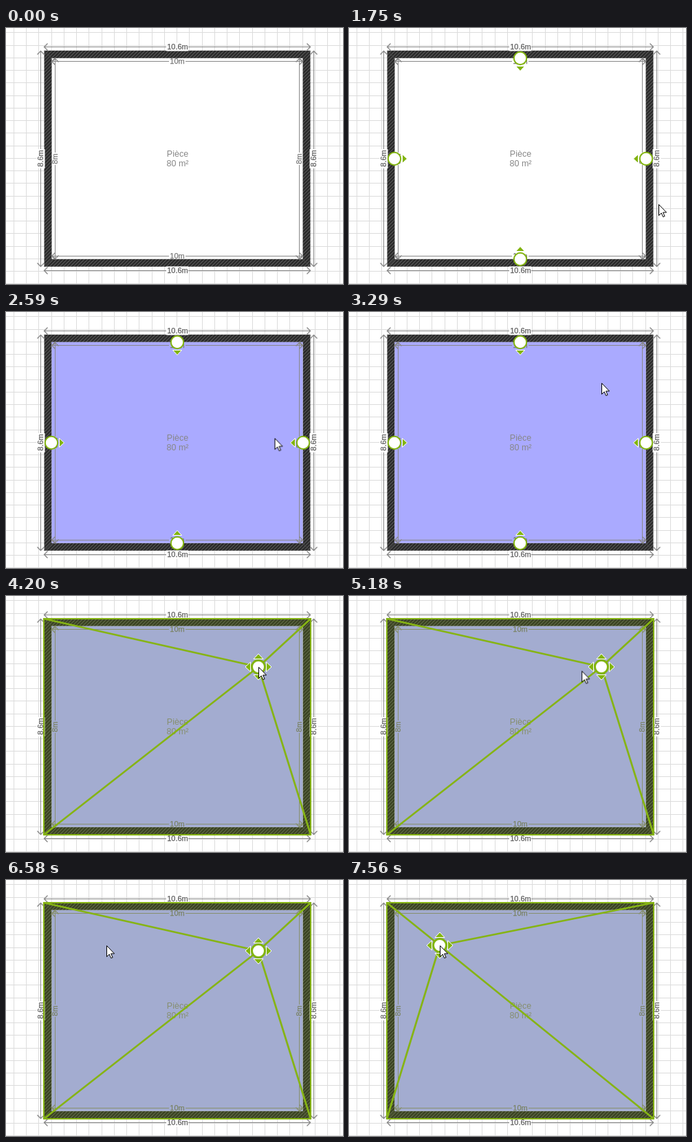
Write an HTML page that moves like this. It is 490 by 372 pixels and loops after 8 s.

```html
<!DOCTYPE html>
<html lang="fr">
<head>
<meta charset="utf-8">
<title>Plan de pièce</title>
<style>
html, body { margin: 0; width: 100%; height: 100%; overflow: hidden; background: #fff; }
svg { display: block; width: 490px; height: 372px; font-family: "Liberation Sans", Arial, sans-serif; text-anchor: middle; }
.grid { stroke: #dcdcdc; }
.dim path { fill: none; stroke: #888; }
.dim text { font-size: 11px; fill: #5c5c5c; stroke: #5c5c5c; stroke-width: .25px; }
.dim.inner text { fill: #777; stroke: #777; }
.name { font-size: 12.5px; fill: #878787; }
.knob { fill: #fff; stroke: #82b40f; }
.arrow { fill: #82b40f; stroke: #fff; }
.roof { fill: none; stroke: #86b414; stroke-width: 2.7; }

/* Switches start hidden; the small negative delay keeps steps clear of their boundaries. */
.timed { visibility: hidden; animation: 8s step-end -5ms infinite; }
#knobs { animation-name: knobs; }
#hover { animation-name: hover; }
#select { animation-name: select; }
#roofA { animation-name: roof-a; }
#roofB { animation-name: roof-b; }
@keyframes knobs { 7.875% { visibility: visible } 52.5%, 100% { visibility: hidden } }
@keyframes hover { 22.75%, 100% { visibility: visible } }
@keyframes select { 52.5%, 100% { visibility: visible } }
@keyframes roof-a { 52.5% { visibility: visible } 94.5%, 100% { visibility: hidden } }
@keyframes roof-b { 94.5%, 100% { visibility: visible } }

/* The pointer advances once every 70 ms. */
#pointer { animation: pointer 8s -5ms infinite; }
@keyframes pointer {
  0% { transform: translate(600px, 266px); animation-timing-function: step-end }
  20.125% { transform: translate(488px, 266px); animation-timing-function: steps(2) }
  21.875% { transform: translate(450px, 256px); animation-timing-function: steps(1) }
  22.75% { transform: translate(424px, 248px); animation-timing-function: steps(2) }
  24.5% { transform: translate(409px, 237px); animation-timing-function: steps(6) }
  29.75% { transform: translate(398px, 209px); animation-timing-function: steps(12) }
  40.25% { transform: translate(368px, 106px); animation-timing-function: steps(1) }
  41.125%, 61.25% { transform: translate(367px, 103px); animation-timing-function: steps(5) }
  65.625% { transform: translate(331px, 110px); animation-timing-function: steps(7) }
  71.75% { transform: translate(275px, 108px); animation-timing-function: steps(1) }
  72.625% { transform: translate(268px, 107px); animation-timing-function: steps(11) }
  82.25% { transform: translate(146px, 95px); animation-timing-function: steps(3) }
  84.875%, 100% { transform: translate(132px, 95px) }
}
</style>
</head>
<body>
<svg viewBox="0 0 490 372">
  <defs>
    <pattern id="hatch" width="5" height="5" patternUnits="userSpaceOnUse">
      <rect width="5" height="5" fill="#2d2d2d"/>
      <path d="M-1 1L1-1M-1 6L6-1M4 6L6 4" stroke="#656565"/>
    </pattern>
  </defs>
  <path class="grid" id="grid"/>
  <rect x="55.5" y="32.8" width="387" height="314" fill="url(#hatch)"/>
  <path d="M55.5 33l11 11M442.5 33l-11 11M55.5 347l11-11M442.5 347l-11-11" stroke="#4a4a4a"/>
  <rect x="66.5" y="43.8" width="365" height="292" fill="#fff"/>
  <rect class="timed" id="hover" x="66.5" y="43.8" width="365" height="292" fill="#aaf"/>
  <g id="dims"></g>
  <g class="name">
    <text x="249.5" y="187">Pièce</text>
    <text x="249.5" y="201">80 m²</text>
  </g>
  <g class="timed" id="knobs"></g>
  <rect class="timed" id="select" x="55" y="33" width="388" height="314" fill="#82b400" fill-opacity=".185" stroke="#86b414" stroke-width="2"/>
  <g class="timed" id="roofA"></g>
  <g class="timed" id="roofB"></g>
  <path id="pointer" d="M.5 .5v16l3.7-3.6 2.5 5.6 2.4-1-2.5-5.5h5z" fill="#fff" stroke="#000"/>
</svg>
<script>
const byId = id => document.getElementById(id);

// Half-metre grid aligned with the inner wall faces, snapped to whole pixels.
function gridPath() {
  const pitch = 18.25;
  let d = '';
  for (let i = -3; i < 24; i++) d += `M${Math.round(66.5 + pitch * i) - .5} 0V372`;
  for (let i = -2; i < 19; i++) d += `M0 ${Math.round(43.8 + pitch * i) - .5}H490`;
  return d;
}

// Dimension line starting at (x, y); vertical ones run upwards.
function dim(x, y, length, label, vertical, inner) {
  const mid = length / 2, gap = inner ? (vertical ? 9 : 12) : (vertical ? 14 : 16);
  const plate = inner ? '' : `<rect x="${mid - gap}" y="-6" width="${2 * gap}" height="12" fill="#fff"/>`;
  return `<g class="dim ${inner ? 'inner' : ''}" transform="translate(${x} ${y}) rotate(${vertical ? -90 : 0})">
    ${plate}<path d="M0 0H${mid - gap}M${mid + gap} 0H${length}"/>
    <path d="M5.5-5L.5 0l5 5M${length - 5.5}-5l5 5-5 5" stroke-width="1.4"/>
    <text x="${mid + (inner ? 0 : .5)}" y="3.5">${label}</text></g>`;
}

// Triangle whose base lies `distance` from (x, y), pointing along `angle`.
const arrow = (x, y, angle, distance, height, half) =>
  `<path class="arrow" transform="translate(${x} ${y}) rotate(${angle})" d="M${distance}-${half}l${height} ${half}l-${height} ${half}z"/>`;

const knob = (x, y, r, weight) =>
  `<circle class="knob" cx="${x}" cy="${y}" r="${r}" stroke-width="${weight}"/>`;

const wallKnob = (x, y, angle) => arrow(x, y, angle, 11.5, 7, 6.5) + knob(x, y, 9.2, 2);

function roof(x, y) {
  const corners = [[55, 33], [443, 33], [443, 347], [55, 347]];
  const ridges = corners.map(([cx, cy]) => `M${cx} ${cy}L${x} ${y}`).join('');
  const arrows = [0, 90, 180, 270].map(a => arrow(x, y, a, 11.5, 7.5, 7)).join('');
  return `<path class="roof" d="${ridges}"/>${arrows}${knob(x, y, 9.5, 3)}`;
}

byId('grid').setAttribute('d', gridPath());
byId('dims').innerHTML =
  [27.5, 352.5].map(y => dim(55, y, 388, '10.6m', false, false)).join('') +
  [50.5, 447.5].map(x => dim(x, 347, 314, '8.6m', true, false)).join('') +
  [48.5, 331.5].map(y => dim(66, y, 366, '10m', false, true)).join('') +
  [71.5, 426.5].map(x => dim(x, 336, 292, '8m', true, true)).join('');
byId('knobs').innerHTML = wallKnob(249, 44, 90) + wallKnob(249, 336, -90) +
  wallKnob(66, 190, 0) + wallKnob(432, 190, 180);
byId('roofA').innerHTML = roof(367, 103);
byId('roofB').innerHTML = roof(132, 95);
</script>
</body>
</html>
```
